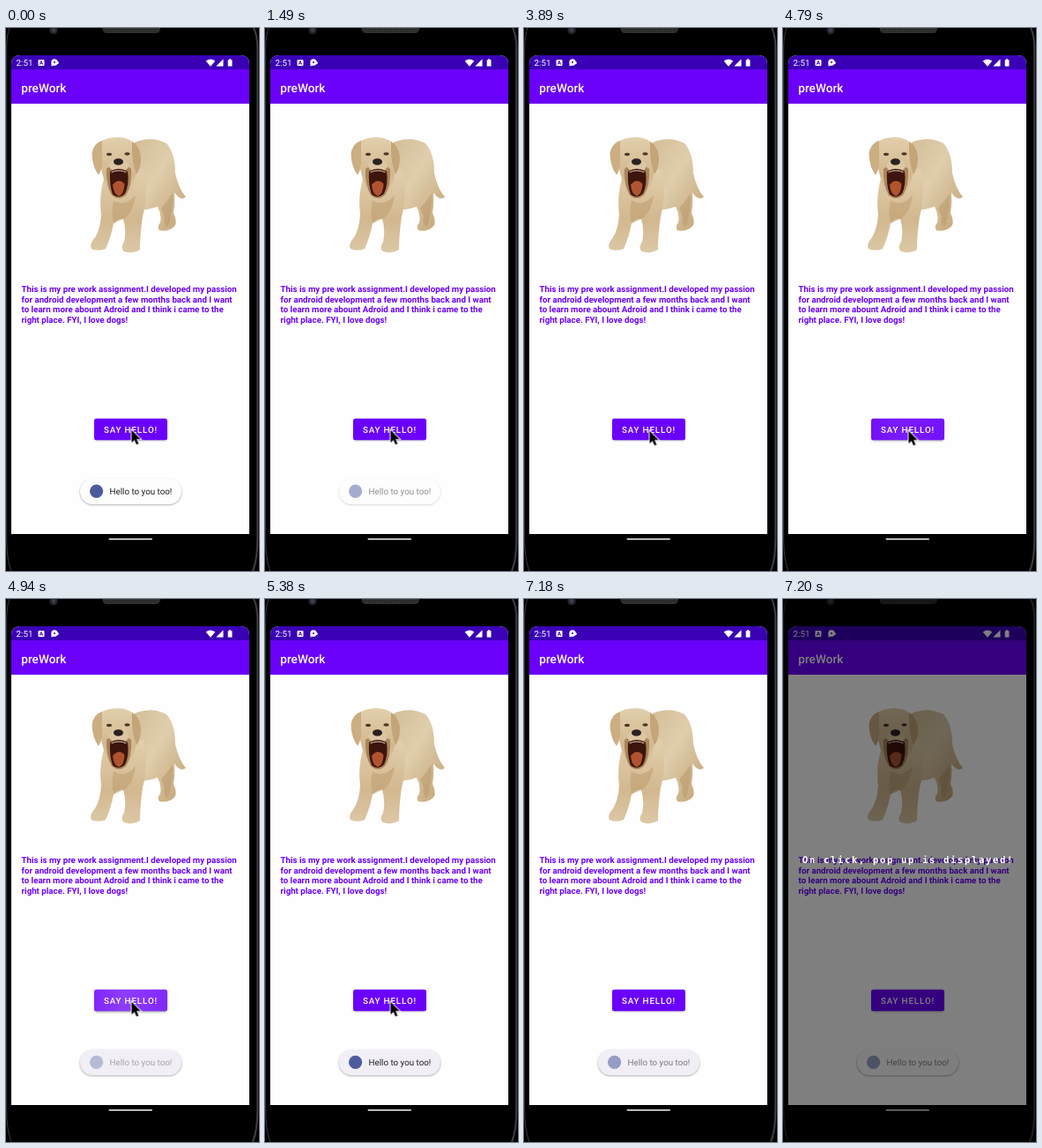
An HTML page that plays this animation: 287 px wide and 617 px high, repeating every 9000 ms.

```html
<!DOCTYPE html>
<html lang="en">
<head>
<meta charset="utf-8">
<title>preWork</title>
<style>
html, body { margin: 0; width: 100%; height: 100%; overflow: hidden; background: #000; }
svg { display: block; width: 287px; height: 617px; }
text { font-family: Roboto, "Open Sans", sans-serif; text-rendering: geometricPrecision; }
.body { font-size: 9.73px; font-weight: 700; fill: #6a00f8; }
.title { font-size: 13.6px; font-weight: 500; fill: #fff; }
.label { font-size: 9.8px; font-weight: 500; letter-spacing: .87px; fill: #fff; }
.small { font-size: 9.8px; }
.caption { font: 700 10.5px "DejaVu Sans Mono", monospace; letter-spacing: 1.68px; fill: #fff; }

#toast, #pill, #msg, #ripple, #lift, #cursor, #dim { animation: 9s step-end infinite; }
#toast { animation-name: toast; }
#pill { animation-name: pill; }
#msg { animation-name: msg; }
#ripple { animation-name: ripple; }
#lift { animation-name: lift; }
#cursor { animation-name: cursor; }
#dim { animation-name: dim; }

@keyframes toast {
  0% { opacity: 1; }
  16.5555% { opacity: .5; }
  19.8888% { opacity: .05; }
  21.5555% { opacity: 0; }
  54.8888%, 100% { opacity: 1; }
}
@keyframes pill {
  0% { fill: #fdfdfe; }
  54.8888% { fill: #f1eff5; }
  80%, 100% { fill: #fdfdfe; }
}
@keyframes msg {
  0% { opacity: 1; }
  54.8888% { opacity: .36; }
  56.5555% { opacity: .82; }
  58.1111% { opacity: 1; }
  79.7777%, 100% { opacity: .56; }
}
@keyframes ripple {
  0% { opacity: 0; }
  53.2222% { opacity: .45; }
  54.8888% { opacity: 1; }
  58.1111% { opacity: .4; }
  59.7777%, 100% { opacity: 0; }
}
@keyframes lift {
  0% { opacity: 0; }
  53.2222% { opacity: .6; }
  54.8888% { opacity: 1; }
  58.1111%, 100% { opacity: 0; }
}
@keyframes cursor {
  0% { transform: translate(142.5px, 456.8px); opacity: 1; }
  43.2222% { transform: translate(142.5px, 457.8px); opacity: 1; }
  61.4444% { transform: translate(190.5px, 555px); opacity: 1; }
  63.1111% { transform: translate(203.5px, 607px); opacity: 1; }
  64.7777% { transform: translate(203.5px, 608px); opacity: 1; }
  66.4444%, 100% { transform: translate(203.5px, 608px); opacity: 0; }
}
@keyframes dim {
  0% { opacity: 0; }
  80%, 100% { opacity: 1; }
}
</style>
</head>
<body>
<svg viewBox="0 0 287 617">
  <defs>
    <linearGradient id="fur" x1="0" y1="0" x2="0" y2="1">
      <stop offset="0" stop-color="#e2cfad"/>
      <stop offset=".6" stop-color="#d2b88f"/>
      <stop offset="1" stop-color="#dcc8a6"/>
    </linearGradient>
    <linearGradient id="side" x1="0" y1="0" x2="1" y2="1">
      <stop offset="0" stop-color="#d3bc96"/>
      <stop offset=".45" stop-color="#dfcdac"/>
      <stop offset="1" stop-color="#c2a273"/>
    </linearGradient>
    <linearGradient id="glow">
      <stop offset="0" stop-color="#fff" stop-opacity=".15"/>
      <stop offset=".4" stop-color="#fff" stop-opacity=".24"/>
      <stop offset="1" stop-color="#fff" stop-opacity=".16"/>
    </linearGradient>
    <pattern id="mesh" width="2" height="2" patternUnits="userSpaceOnUse">
      <rect width="2" height="2" fill="#242424"/>
      <rect width="1" height="1" fill="#4c4c4c"/>
    </pattern>
    <filter id="soft" x="-20%" y="-40%" width="140%" height="190%"><feGaussianBlur stdDeviation=".9"/></filter>
    <filter id="fuzz"><feGaussianBlur stdDeviation=".5"/></filter>
  </defs>

  <!-- phone body -->
  <rect width="287" height="617"/>
  <g fill="none" stroke="#3c3c3e">
    <path d="M4 0Q.7 8 .7 24V580Q.7 604 6 617"/>
    <path d="M281 0Q285.300 8 285.300 24V580Q285.300 604 280 617" stroke-width="2.200"/>
  </g>
  <circle cx="54" cy="2.500" r="4.600" fill="#25262b"/>
  <circle cx="54" cy="2.500" r="2.200" fill="#3d404c"/>
  <path d="M109.500 0H175Q175 6 169 6H115.500Q109.500 6 109.500 0Z" fill="url(#mesh)"/>

  <!-- screen -->
  <path d="M6 575V41Q6 31 16 31H266Q276 31 276 41V575Z" fill="#fefefe"/>
  <path d="M6 47.500V41Q6 31 16 31H266Q276 31 276 41V47.500Z" fill="#3b00b6"/>
  <rect x="6" y="47" width="270" height="39" fill="#6a00fa"/>
  <rect x="116.500" y="580" width="49.500" height="1.500" rx=".7" fill="#f4f4f4"/>

  <!-- status bar -->
  <text x="11.500" y="43" class="small" fill="#fff">2:51</text>
  <g fill="#fff">
    <rect x="36.500" y="36" width="7" height="7" rx="1"/>
    <path d="M38.200 41.700L40 37.300L41.800 41.700M38.900 40.300H41.100" fill="none" stroke="#3b00b6" stroke-width=".9"/>
    <circle cx="55" cy="39" r="3.700"/>
    <path d="M51.500 40V43.500L55 42Z"/>
    <circle cx="58.300" cy="39.500" r="1.500"/>
    <circle cx="55" cy="39" r="1.100" fill="#3b00b6"/>
    <path d="M226.700 37.500Q232 33.600 237.300 37.500L232 43.700Z"/>
    <path d="M246.500 35.300V43.500H238.300Z"/>
    <path d="M251.700 36.300H253V35.300H255.200V36.300H256.500V43.500H251.700Z"/>
  </g>
  <text x="17.300" y="72.500" class="title">preWork</text>

  <!-- puppy -->
  <g filter="url(#fuzz)">
    <path d="M146 130Q165 122 182 131Q192 142 192 165Q196 183 204 192Q198 197 191 187Q192 200 190 210Q194 219 192 224Q186 232 174 230Q171 226 175 221Q177 212 172 203Q160 207 150 207L138 180Z" fill="url(#side)"/>
    <path d="M176 205Q184 196 189 188Q190 202 187 212Q186 222 183 226Q178 222 180 214Z" fill="#b7966a" opacity=".5"/>
    <path d="M112 168Q105 190 108 212Q107 228 101 238Q94 246 97 251Q104 254 113 251Q119 238 122 222Q128 216 133 217Q137 230 134 243Q129 250 134 254Q144 257 152 252Q152 235 155 214Q162 190 156 160Z" fill="url(#fur)"/>
    <path d="M122 196Q135 204 147 190Q144 211 133 217L122 222Q119 208 122 196Z" fill="#bd9d70" opacity=".55"/>
    <path d="M106 130Q113 124 128 124Q142 125 148 134Q152 150 147 168Q142 188 130 194Q117 190 111 172Q104 148 106 130Z" fill="url(#fur)"/>
    <path d="M109 128Q99 131 97.500 143Q98 158 105 167Q110 160 109 146Z" fill="#cbae82"/>
    <path d="M143 129Q151 133 153 146Q153 160 148 166Q143 152 143 140Z" fill="#c4a577"/>
    <path d="M114 160Q128 150 142 160Q143 180 136 190Q128 197 120 190Q113 178 114 160Z" fill="#a9855a"/>
    <ellipse cx="128" cy="156.500" rx="11" ry="7" fill="#dcc6a2"/>
    <path d="M118 163Q128 157 138 163Q140 178 135 188Q128 195 121 189Q117 178 118 163Z" fill="#3e150c"/>
    <path d="M121 178Q128 170 134.500 177Q134 189 128 191Q122 189 121 178Z" fill="#b05430"/>
    <path d="M119.500 164Q128 160 136.500 164" fill="none" stroke="#dccbb2" stroke-width="1"/>
    <ellipse cx="127.500" cy="152" rx="5.500" ry="3.800" fill="#2a2220"/>
    <ellipse cx="117" cy="143.500" rx="3" ry="1.700" fill="#4c3824"/>
    <ellipse cx="137.500" cy="143" rx="3" ry="1.700" fill="#4c3824"/>
  </g>

  <text class="body">
    <tspan x="17.500" y="300.200">This is my pre work assignment.I developed my passion</tspan>
    <tspan x="17.500" y="311.700">for android development a few months back and I want</tspan>
    <tspan x="17.500" y="323.200">to learn more abount Adroid and I think i came to the</tspan>
    <tspan x="17.500" y="334.700">right place. FYI, I love dogs!</tspan>
  </text>

  <!-- button -->
  <rect x="100.500" y="445" width="82" height="24" rx="2.500" opacity=".25" filter="url(#soft)"/>
  <rect id="lift" x="100.500" y="446" width="82" height="24" rx="2.500" fill-opacity=".15" filter="url(#soft)"/>
  <rect x="100" y="443.800" width="83" height="24.400" rx="2.500" fill="#6a00fa"/>
  <rect id="ripple" x="100" y="443.800" width="83" height="24.400" rx="2.500" fill="url(#glow)"/>
  <text x="111" y="459.700" class="label">SAY HELLO!</text>

  <!-- toast -->
  <g id="toast">
    <rect x="84" y="513" width="115" height="29" rx="14.500" opacity=".36" filter="url(#soft)"/>
    <rect id="pill" x="84" y="511.800" width="115" height="29.400" rx="14.700"/>
    <g id="msg">
      <circle cx="102.600" cy="526.300" r="7.600" fill="#4c5b9e"/>
      <text x="117.500" y="529.800" class="small" fill="#202024">Hello to you too!</text>
    </g>
  </g>

  <g id="cursor">
    <path d="M0 0V14.200L3.200 11.200L5.500 16.500L7.900 15.500L5.600 10.300H10.200Z" transform="translate(.4 1)" opacity=".3" filter="url(#fuzz)"/>
    <path d="M0 0V14.200L3.200 11.200L5.500 16.500L7.900 15.500L5.600 10.300H10.200Z" stroke="#fff" stroke-width="1.800" paint-order="stroke"/>
  </g>

  <g id="dim">
    <rect width="287" height="617" opacity=".5"/>
    <text x="22" y="299.600" class="caption">On click, pop up is displayed!</text>
  </g>
</svg>
</body>
</html>
```
